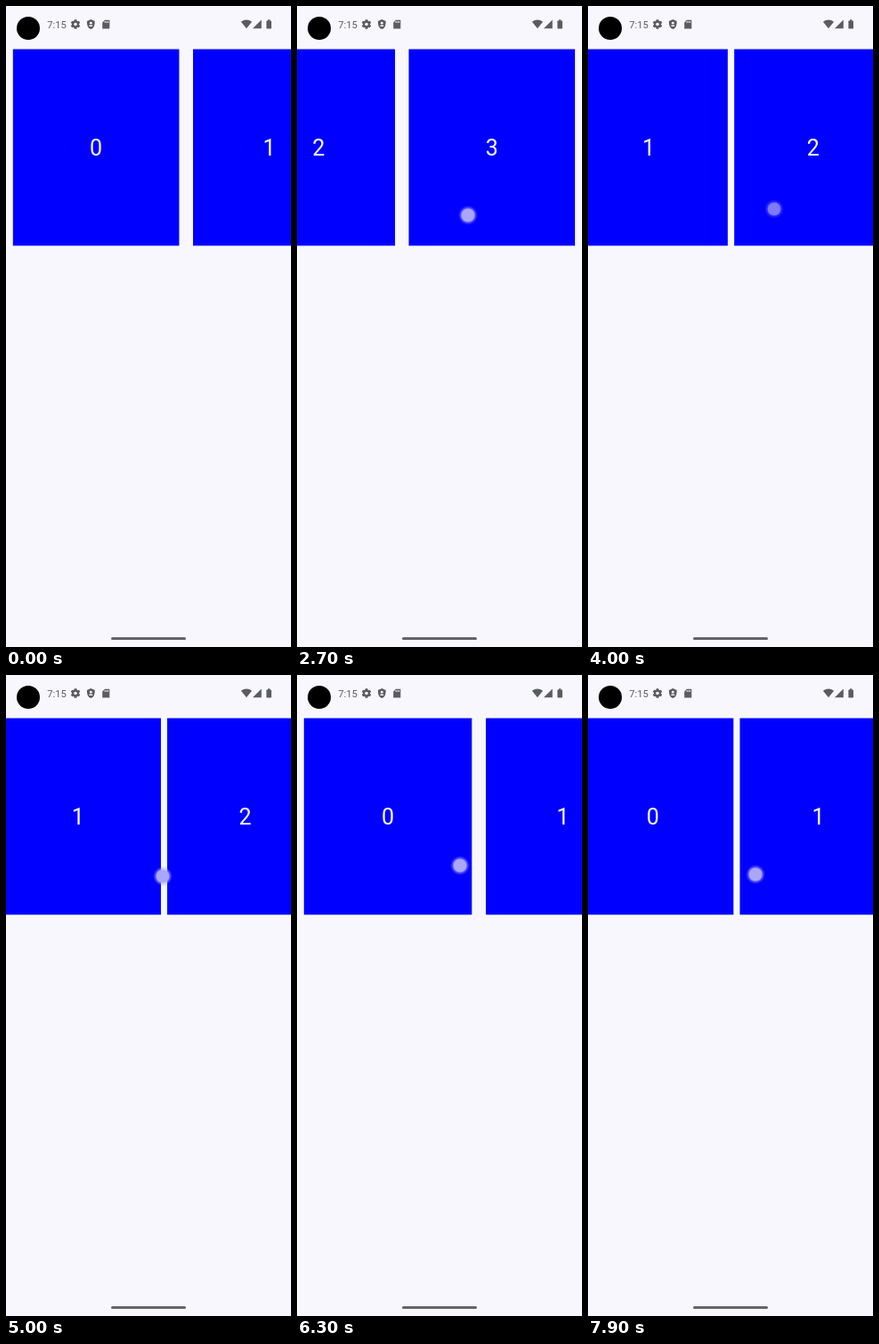
Animation, 320 px wide and 720 px high, one loop 8 s. Source, as an HTML page with a canvas:

```html
<!DOCTYPE html>
<html lang="en">
<head>
<meta charset="utf-8">
<title>Carousel</title>
<style>
html, body { margin: 0; width: 100%; height: 100%; overflow: hidden; background: #f7f7fd; }
canvas { display: block; width: 320px; height: 720px; }
</style>
</head>
<body>
<canvas id="stage" width="320" height="720"></canvas>
<script>
const ctx = document.getElementById('stage').getContext('2d');
const LOOP = 8000, STEP = 100;
const BG = '#f7f7fd', BLUE = '#0000ff', INK = '#5b5c62';
const COUNT = 4, PITCH = 195, FULL = 186.6, MARGIN = 7.8, END = 466.5;

// A swipe: finger down, moving, lifted, list at rest; then the finger's
// start and travel, the scroll it ends on and how early the fling peaks.
const swipe = (down, move, lift, rest, x, y, dx, dy, to, snap) =>
  ({ down, move, lift, rest, x, y, dx, dy, to, snap });
const SWIPES = [
  swipe(1100, 1200, 1400, 1600, 240, 217, -145, 8, END, 1),
  swipe(2700, 2700, 3000, 3500, 192, 235, 77, 3, 264, 1.8),
  swipe(3700, 3800, 4000, 4300, 179, 229, 30, -1, 216, 1.8),
  swipe(4900, 5000, 5200, 5700, 176, 226, 60, 2, 0, 1.27),
  swipe(6300, 6300, 6600, 6900, 183, 214, 67, 2, 0, 1),
  swipe(7300, 7500, 8100, 7900, 236, 212, -88, 22, 31.5, 1)
];

const clamp = (v, lo = 0, hi = 1) => Math.min(hi, Math.max(lo, v));
const phase = (t, a, b) => clamp((t - a) / (b - a));

function fling(p, snap) {
  const u = 1 - (1 - p) ** snap;
  return u * u * (3 - 2 * u);
}

const scrollAt = t => SWIPES.reduce(
  (s, g) => s + (g.to - s) * fling(phase(t, g.move, g.rest), g.snap), 0);

// Overscroll: hitting the start, then a pull against it.
function stretchAt(t) {
  if (t < 5700 || t >= 6900) return 0;
  return 0.01 + 0.01 * Math.exp((5700 - t) / 150)
    + 0.017 * Math.sin(Math.PI * phase(t, 6300, 6900));
}

function shape(color, points) {
  ctx.fillStyle = color;
  ctx.beginPath();
  points.forEach(([x, y]) => ctx.lineTo(x, y));
  ctx.fill();
}

function disc(x, y, r, color) {
  ctx.fillStyle = color;
  ctx.beginPath();
  ctx.arc(x, y, r, 0, Math.PI * 2);
  ctx.fill();
}

function rect(x, y, w, h, color, r = 0) {
  ctx.fillStyle = color;
  ctx.beginPath();
  ctx.roundRect(x, y, w, h, r);
  ctx.fill();
}

function text(str, x, y, size, color, align) {
  ctx.font = size + 'px Roboto, sans-serif';
  ctx.textAlign = align;
  ctx.fillStyle = color;
  ctx.fillText(str, x, y);
}

function gear(x, y) {
  for (let i = 0; i < 6; i++) {
    ctx.save();
    ctx.translate(x, y);
    ctx.rotate(i * Math.PI / 3);
    rect(-1.5, -5.3, 3, 3, INK, 0.4);
    ctx.restore();
  }
  disc(x, y, 4, INK);
  disc(x, y, 1.8, BG);
}

function shield(x, y) {
  ctx.fillStyle = INK;
  ctx.beginPath();
  ctx.moveTo(x, y - 5.5);
  ctx.lineTo(x + 4.4, y - 3.6);
  ctx.quadraticCurveTo(x + 4.8, y + 4, x, y + 5.6);
  ctx.quadraticCurveTo(x - 4.8, y + 4, x - 4.4, y - 3.6);
  ctx.fill();
  disc(x, y - 1.3, 1.4, BG);
  rect(x - 2, y + 0.9, 4, 1.5, BG, 0.7);
}

function statusBar() {
  disc(25, 25, 13, '#000');
  text('7:15', 46.3, 24.6, 11.2, INK, 'left');
  gear(78, 20.5);
  shield(95.3, 20.5);

  shape(INK, [[111, 15.7], [116.3, 15.7], [116.3, 25.4], [108.2, 25.4], [108.2, 18.5]]);
  for (let i = 0; i < 3; i++) rect(110.6 + i * 1.8, 17, 0.9, 2, BG);

  ctx.fillStyle = INK;
  ctx.beginPath();
  ctx.moveTo(270, 25.3);
  ctx.lineTo(263.9, 17.8);
  ctx.quadraticCurveTo(270, 13.2, 276.1, 17.8);
  ctx.fill();
  shape(INK, [[286.8, 15.4], [286.8, 25.3], [277, 25.3]]);
  rect(292.4, 16.4, 5.6, 9.2, INK, 0.8);
  rect(294, 15.3, 2.4, 1.6, INK);
}

// Cards shrink toward either side; the gap widens at both scroll limits.
function cards(s) {
  const atStart = clamp(1 - s / 26);
  const atEnd = clamp(1 - (END - s) / 34);
  const leftOf = i => 202 - s + PITCH * (i - 1);
  const k = clamp(Math.ceil((91 - leftOf(0)) / PITCH), 1, COUNT - 1);
  const base = leftOf(k);
  const gap = 8 + Math.cos((base - 91) / PITCH * 2 * Math.PI) + 8.5 * atStart + 7 * atEnd;
  const wLeft = x => Math.min(FULL, 136 + 0.57 * (x - 91));
  const wRight = x => Math.min(FULL, FULL - 0.13 * (x - 91) + 4.5 * atEnd);

  const list = [];
  for (let i = k, left = base + 8 * atStart; i < COUNT && left < 320; i++) {
    const w = wRight(left);
    list.push([i, left, w]);
    left += w + gap;
  }
  for (let i = k - 1, ref = base, right = base + 8 * atStart - gap; i >= 0 && right > 0; i--) {
    const w = wLeft(ref) + 16 * atEnd;
    list.push([i, right - w, w]);
    ref = right - w;
    right = ref - gap;
  }
  return list;
}

function touch(t) {
  const g = SWIPES.find(g => t >= g.down && t < g.lift + STEP);
  if (!g) return;
  const p = phase(t, g.move, g.lift) ** 1.5;
  const x = g.x + g.dx * p, y = g.y + g.dy * p;
  ctx.globalAlpha = clamp((g.lift + STEP - t) / (2 * STEP));
  const glow = ctx.createRadialGradient(x, y, 6.5, x, y, 11);
  glow.addColorStop(0, 'rgba(200,196,255,0.8)');
  glow.addColorStop(1, 'rgba(120,110,255,0)');
  disc(x, y, 11, glow);
  disc(x, y, 7.3, '#aaa6fb');
  ctx.globalAlpha = 1;
}

function draw(t) {
  rect(0, 0, 320, 720, BG);
  statusBar();
  const scale = 1 + stretchAt(t);
  for (const [i, left, w] of cards(scrollAt(t))) {
    const x = MARGIN + (left - MARGIN) * scale;
    rect(x, 48.6, w * scale, 220.6, BLUE);
    text(String(i), x + w * scale / 2, 168, 25, '#fff', 'center');
  }
  touch(t);
  rect(118, 709, 84, 3, '#64656b', 1.5);
}

const start = performance.now();
function tick() {
  const t = (performance.now() - start) % LOOP;
  draw(Math.floor(t / STEP) * STEP);
  requestAnimationFrame(tick);
}
tick();
</script>
</body>
</html>
```
